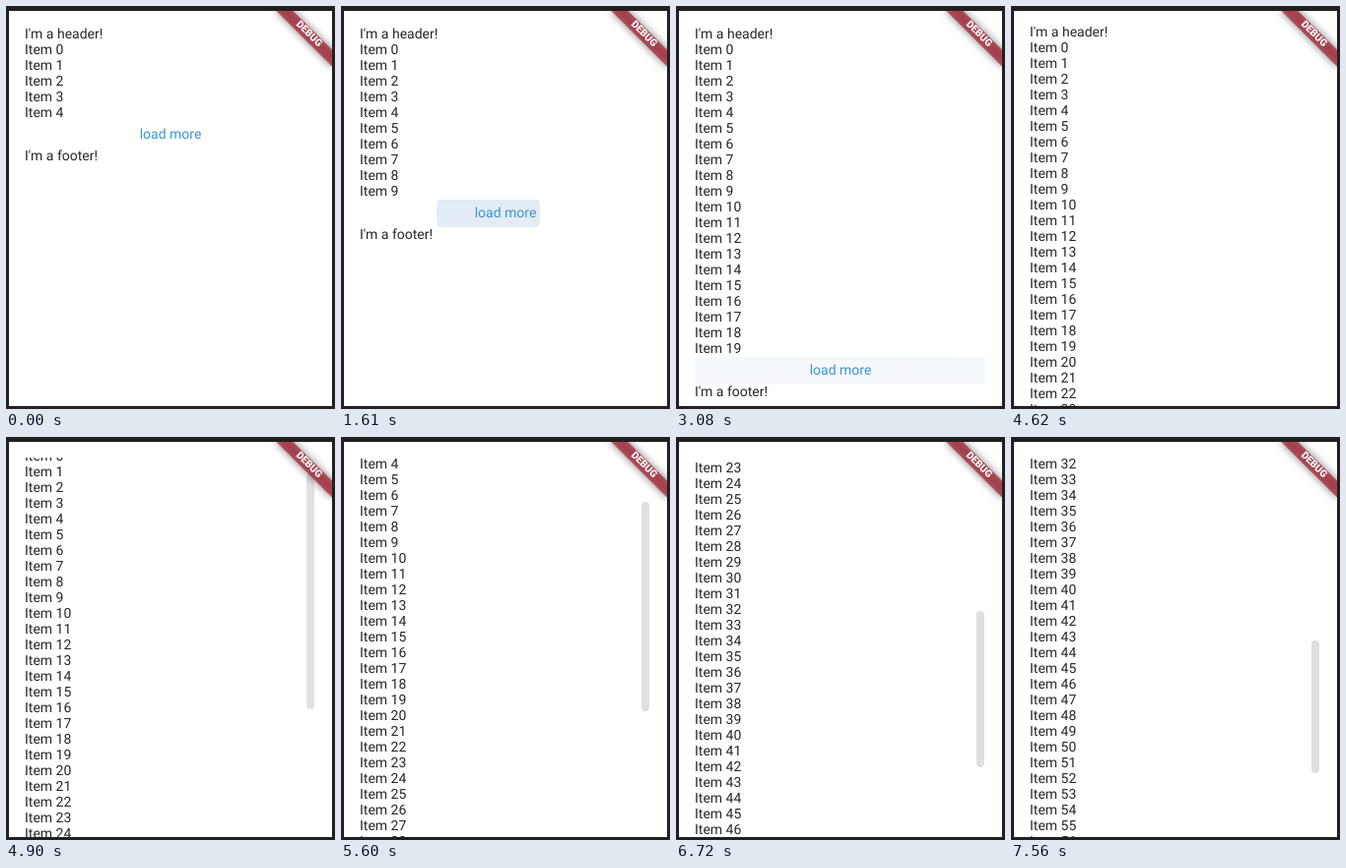
An HTML page for the animation above (8 s loop, 334 by 410 pixels).

```html
<!DOCTYPE html>
<html lang="en">
<head>
<meta charset="utf-8">
<title>Load more list</title>
<style>
  html, body { margin: 0; width: 334px; height: 410px; overflow: hidden; background: #231f20; }
  div { position: absolute; box-sizing: border-box; }
  #screen {
    left: 3px; top: 5px; width: 328px; height: 402px;
    overflow: hidden; background: #fff;
    font: 14px/17px Roboto, sans-serif; color: #262626;
    white-space: pre; text-rendering: geometricPrecision;
  }
  #view { left: 16px; top: 16px; width: 296px; height: 386px; overflow: hidden; }
  #list { left: 0; top: 0; width: 100%; }
  #list #more {
    width: 296px; height: 28px; padding-top: 6px; border-radius: 4px;
    text-align: center; color: #3a95d0;
  }
  #thumb { left: 302px; width: 8px; border-radius: 4px; background: #dfdfdf; }
  #corner { left: 328px; top: 0; width: 0; height: 0; transform: rotate(45deg); }
  #corner div { left: -40px; top: 28px; width: 80px; height: 12px; }
  #shade { background: rgba(0, 0, 0, .5); filter: blur(4px); }
  #ribbon {
    background: rgba(170, 24, 40, .66); color: #fff;
    font: 900 10.2px/12px Roboto, sans-serif; text-align: center;
  }
</style>
</head>
<body>
<div id="screen">
  <div id="view"><div id="list"></div></div>
  <div id="thumb"></div>
  <div id="corner"><div id="shade"></div><div id="ribbon">DEBUG</div></div>
</div>
<script>
const LOOP = 8000, STEP = 70;
const LINE = 16, BUTTON = 28, VIEW = 386, PAD = 16;
const BATCH = 5, MAX_ITEMS = 65, AUTO_LOAD = 3850;
const TAPS = [630, 1610, 2660], LOAD_DELAY = 70, RIPPLE = 210;
const GESTURES = [
  { start: 4550, ms: 420, distance: 27 },
  { start: 5390, ms: 490, distance: 137 },
  { start: 6300, ms: 420, distance: 217 },
  { start: 7210, ms: 350, distance: 148 }
];

const $ = id => document.getElementById(id);
const list = $('list'), thumb = $('thumb');

function addRow(text, top) {
  const row = document.createElement('div');
  row.textContent = text;
  row.style.top = top + 'px';
  list.append(row);
  return row;
}

addRow("I'm a header!", 0);
const items = Array.from({ length: MAX_ITEMS }, (_, i) => addRow('Item ' + i, LINE * (i + 1)));
const more = addRow('load more', 0);
more.id = 'more';
const footer = addRow("I'm a footer!", 0);

const clamp = x => Math.min(1, Math.max(0, x));
const ease = x => x * x * (3 - 2 * x);

const scrollAt = t => Math.round(GESTURES.reduce(
  (sum, g) => sum + g.distance * ease(clamp((t - g.start) / g.ms)), 0));

// Taps add one batch each; later, batches keep 160px below the viewport.
function countAt(t, offset) {
  if (t < AUTO_LOAD) return BATCH * (1 + TAPS.filter(tap => t >= tap + LOAD_DELAY).length);
  const fixed = 2 * LINE + BUTTON;
  return BATCH * Math.ceil((offset + VIEW + 160 - fixed) / (LINE * BATCH));
}

// The ripple spreads while fading; after the last tap a faint hover stays.
function buttonFill(t) {
  const tap = TAPS.findLast(time => time <= t);
  const age = (t - tap) / RIPPLE;
  const hover = tap === TAPS.at(-1) ? .04 : 0;
  const alpha = age < 1 ? .12 - (.12 - hover) * age : hover;
  if (!alpha) return 'none';
  const radius = 52.5 + 400 * age;
  return `radial-gradient(circle at 130.5px 14px, rgba(30,100,175,${alpha}) ${radius}px, transparent ${radius + .7}px)`;
}

function render(t) {
  const offset = scrollAt(t);
  const count = countAt(t, offset);
  const end = LINE * (count + 1);
  const total = end + BUTTON + LINE;

  items.forEach((row, i) => { row.hidden = i >= count; });
  more.style.top = end + 'px';
  more.style.background = t < AUTO_LOAD ? buttonFill(t) : 'none';
  footer.style.top = end + BUTTON + 'px';
  list.style.transform = `translateY(${-offset}px)`;

  thumb.style.top = PAD + offset / total * VIEW + 'px';
  thumb.style.height = VIEW * VIEW / total + 'px';
  thumb.style.opacity = clamp((t - GESTURES[0].start - STEP) / 300);
}

const start = performance.now();
function tick() {
  const t = (performance.now() - start) % LOOP;
  render(Math.floor(t / STEP) * STEP);
  requestAnimationFrame(tick);
}
tick();
</script>
</body>
</html>
```
